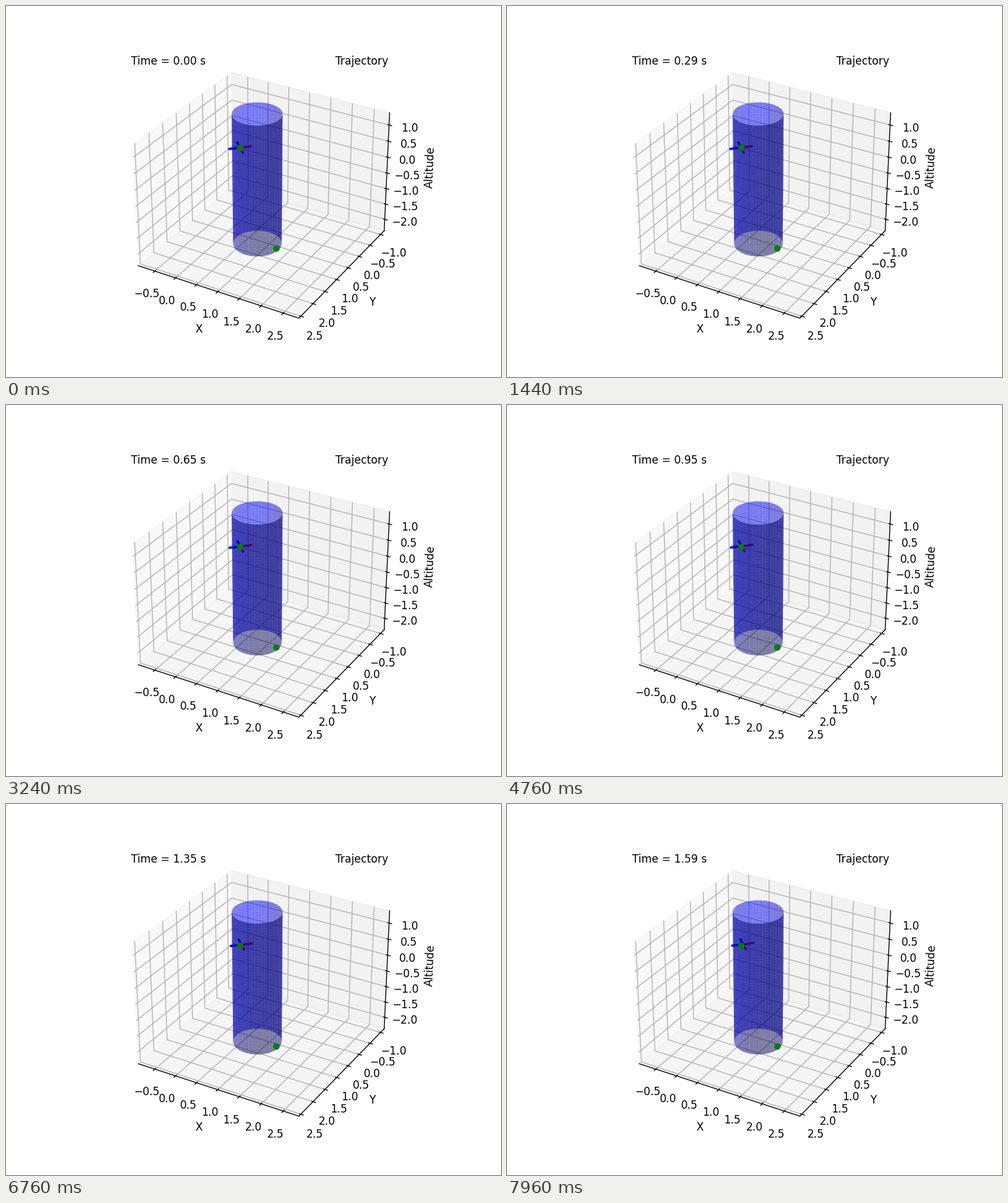
A matplotlib script that plays this animation: 768 by 576 pixels, repeating every 8 s.

```python
import numpy as np
import matplotlib.pyplot as plt
from matplotlib.animation import FuncAnimation
from matplotlib.ticker import MultipleLocator

FRAMES, INTERVAL = 200, 40
STEP = 0.008                       # simulated seconds per frame
ARM, LIFT = 0.16, 0.006            # motor offsets from the drone's centre
HALF = 1.801 * 25 / 24             # half of every axis range, with margin
DRIFT = np.array([0.0076, -0.071, 0.0])
T_END = STEP * (FRAMES - 1)

fig = plt.figure(figsize=(6.4, 4.8), dpi=120)
ax = fig.add_subplot(projection="3d", computed_zorder=False)

# Cylindrical obstacle
theta, height = np.meshgrid(np.linspace(0, 2 * np.pi, 50),
                            np.linspace(-2, 2, 50))
tube = ax.plot_surface(1 + 0.5 * np.cos(theta), 1 + 0.5 * np.sin(theta),
                       height, color="b", alpha=0.5, zorder=3)

# Start and goal
ax.scatter([0, 2], [0, 2], [0, -1], color="green", s=25,
           depthshade=False, zorder=4)

front, = ax.plot([], [], [], lw=2, color="red")
back, = ax.plot([], [], [], lw=2, color="blue")

ax.set_xlim(0.972 - HALF, 0.972 + HALF)
ax.set_ylim(0.7 + HALF, 0.7 - HALF)
ax.set_zlim(-0.5 - HALF, -0.5 + HALF)
for axis in (ax.xaxis, ax.yaxis, ax.zaxis):
    axis.set_major_locator(MultipleLocator(0.5))
ax.set_xlabel("X")
ax.set_ylabel("Y")
ax.set_zlabel("Altitude")

clock = ax.text2D(0.05, 0.95, "", transform=ax.transAxes)
ax.text2D(0.95, 0.95, "Trajectory", transform=ax.transAxes, ha="right")

FRONT_ARMS = np.array([[ARM, -ARM, LIFT], [0, 0, 0], [ARM, ARM, LIFT]])
BACK_ARMS = FRONT_ARMS * [-1, -1, 1]


def update(i):
    t = i * STEP
    pos = DRIFT * (t / T_END) ** 2.1
    front.set_data_3d(*(FRONT_ARMS + pos).T)
    back.set_data_3d(*(BACK_ARMS + pos).T)
    clock.set_text(f"Time = {t:.2f} s")
    return front, back, clock


# The camera never moves, so the tube is projected only once
update(0)
fig.canvas.draw()
tube.do_3d_projection = lambda: 0.0

anim = FuncAnimation(fig, update, frames=FRAMES, interval=INTERVAL,
                     repeat=True, repeat_delay=0)
plt.show()
```
